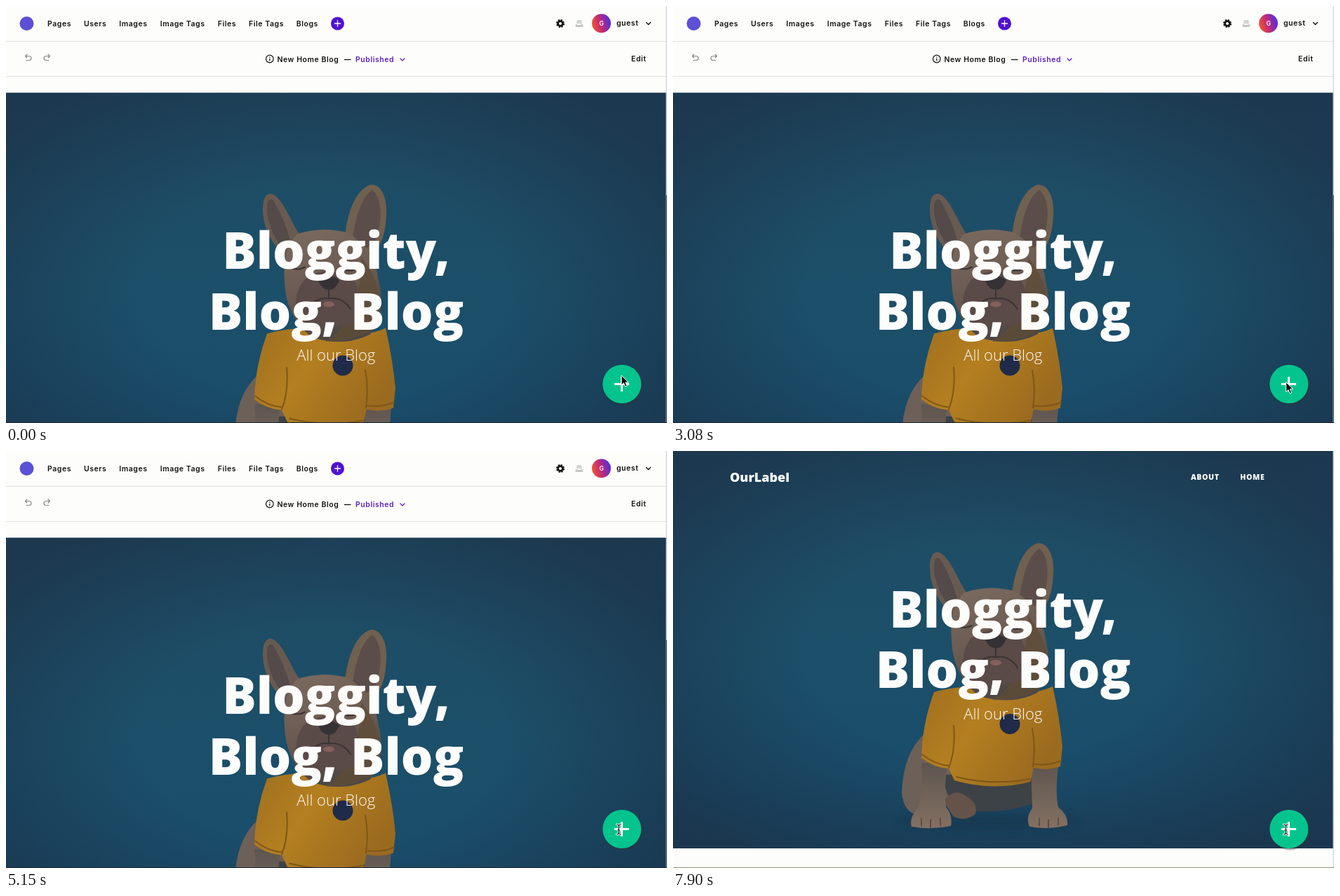
An HTML page for the animation above (8000 ms loop, 942x595 px).

```html
<!DOCTYPE html>
<html lang="en">
<head>
<meta charset="utf-8">
<title>Blog page preview</title>
<style>
  html, body { margin: 0; width: 100%; height: 100%; overflow: hidden; background: #fdfdfb; }
  svg { display: block; width: 942px; height: 595px; }
  .ui { font: 600 10.5px Inter, sans-serif; letter-spacing: .55px; fill: #111; }
  .hero { font-family: "Open Sans", sans-serif; fill: #fdfdfb; }
  .title { font-size: 72px; font-weight: 800; text-anchor: middle; }
  .sub { font-size: 22px; font-weight: 300; text-anchor: middle; }
  .brand { font-size: 18px; font-weight: 800; }
  .link { font-size: 10.6px; font-weight: 800; letter-spacing: .6px; }
  .line { fill: none; stroke-linecap: round; stroke-linejoin: round; }
</style>
</head>
<body>
<svg viewBox="0 0 942 595">
  <defs>
    <linearGradient id="wall" x2="0" y2="1">
      <stop offset="0" stop-color="#1f4b63"/>
      <stop offset=".5" stop-color="#1c4f69"/>
      <stop offset=".85" stop-color="#194d6b"/>
      <stop offset="1" stop-color="#1a4864"/>
    </linearGradient>
    <radialGradient id="vignette" cx=".48" cy=".5" r=".62">
      <stop offset=".45" stop-color="#1b3249" stop-opacity="0"/>
      <stop offset="1" stop-color="#1b3249" stop-opacity=".75"/>
    </radialGradient>
    <linearGradient id="fur" x2=".3" y2="1">
      <stop offset="0" stop-color="#7b6b5f"/>
      <stop offset=".55" stop-color="#6c5b52"/>
      <stop offset="1" stop-color="#4d4745"/>
    </linearGradient>
    <linearGradient id="leg" x2="0" y2="1">
      <stop offset="0" stop-color="#5d554f"/>
      <stop offset="1" stop-color="#847062"/>
    </linearGradient>
    <linearGradient id="shirt" x2="1" y2=".5">
      <stop offset="0" stop-color="#a06f20"/>
      <stop offset=".45" stop-color="#b47f20"/>
      <stop offset="1" stop-color="#9a6a1f"/>
    </linearGradient>
    <linearGradient id="avatar" x1="0" y1=".65" x2="1" y2=".35">
      <stop offset="0" stop-color="#f4552a"/>
      <stop offset=".45" stop-color="#c32a76"/>
      <stop offset="1" stop-color="#4a2fe6"/>
    </linearGradient>
    <filter id="soft" x="-30%" y="-60%" width="160%" height="220%"><feGaussianBlur stdDeviation="6"/></filter>
    <filter id="shade" x="-30%" y="-30%" width="160%" height="160%"><feGaussianBlur stdDeviation="1.3"/></filter>
  </defs>
  <rect width="942" height="595" fill="#fdfdfb"/>

  <g id="page">
    <rect width="941" height="567" fill="url(#wall)"/>
    <rect width="941" height="567" fill="url(#vignette)"/>

    <g id="dog">
      <ellipse cx="450" cy="528" rx="130" ry="12" fill="#12384f" opacity=".7" filter="url(#soft)"/>
      <path d="M360 402Q328 430 326 487Q328 517 352 520L400 500V420Z" fill="#6d6058"/>
      <path d="M380 462H520V500Q470 522 400 510Z" fill="#3d4247"/>
      <path d="M386 500Q400 478 420 494Q435 503 431 518Q415 530 399 521Z" fill="#655349"/>
      <path d="M354 445H391Q386 485 389 508Q399 520 396 535Q368 541 340 536Q336 523 349 510Q358 483 354 445Z" fill="url(#leg)"/>
      <path d="M510 445H550Q544 485 549 508Q564 520 562 534Q535 541 508 536Q502 523 512 510Z" fill="url(#leg)"/>
      <path class="line" d="M354 524v11M367 526v11M381 524v11M522 524v11M535 526v11M549 524v10" stroke="#4d4540" stroke-width="1.5"/>
      <path d="M368 184C362 152 371 139 382 146C397 156 405 183 419 203L400 237Q374 212 368 184Z" fill="#685a51"/>
      <path d="M373 178C370 157 374 149 381 154Q397 181 405 211L395 223Q378 203 373 178Z" fill="#534a49"/>
      <path d="M483 205C487 167 500 139 518 132C533 128 544 149 542 174C541 205 533 220 522 232Z" fill="#70604f"/>
      <path d="M494 206C500 171 508 148 522 139C535 149 538 178 527 211L514 222Z" fill="#5b4d49"/>
      <path d="M372 344Q420 331 460 340Q510 351 541 336Q551 380 555 422L552 450Q534 457 514 452L509 472Q457 486 401 470L393 453Q372 452 354 438Q355 390 372 344Z" fill="url(#shirt)"/>
      <path class="line" d="M355 433Q374 448 394 449M515 447Q537 449 553 442M393 452Q403 427 400 392M513 450Q517 421 512 396M404 465Q456 478 508 468" stroke="#805718" stroke-width="2"/>
      <circle cx="480" cy="389.500" r="14.500" fill="#202b49"/>
      <path d="M415 202Q450 190 487 200Q525 224 531 268Q543 318 519 345Q480 364 435 349Q398 317 397 270Q393 225 415 202Z" fill="url(#fur)"/>
      <path d="M506 235Q543 280 529 330Q506 357 455 355Q506 325 506 235Z" fill="#5f4d36" opacity=".75"/>
      <path d="M424 268Q460 241 496 268Q513 300 499 326Q460 342 416 322Q407 292 424 268Z" fill="#5a4a48"/>
      <path d="M445 268Q460 255 475 268Q469 283 460 281Q450 282 445 268Z" fill="#353235"/>
      <path class="line" d="M404 249q11 6 22 0M480 252q12 5 23-2M460 281v13Q443 291 431 309M460 294Q479 291 491 309" stroke="#3b3435" stroke-width="2"/>
      <ellipse cx="460" cy="302" rx="8" ry="4" fill="#85605c"/>
    </g>

    <g class="hero">
      <text class="title" x="470.5" y="251.5">Bloggity,</text>
      <text class="title" x="470.5" y="338">Blog, Blog</text>
      <text class="sub" x="470.3" y="382.500">All our Blog</text>
    </g>
  </g>

  <g id="siteNav" class="hero">
    <text class="brand" x="81" y="43.5">OurLabel</text>
    <text class="link" x="738" y="41">ABOUT</text>
    <text class="link" x="808.300" y="41">HOME</text>
  </g>

  <g id="editor" class="ui">
    <rect width="942" height="123.500" fill="#fdfdfb"/>
    <path d="M0 50.500H942M0 100.500H942" stroke="#e2e2e2"/>
    <circle cx="29.500" cy="25" r="10" fill="#5b50d6"/>
    <g id="menu"></g>
    <circle cx="472.5" cy="25" r="9.500" fill="#5011d4"/>
    <path class="line" d="M468.500 25h8M472.500 21v8" stroke="#fff" stroke-width="1.3"/>
    <circle cx="790" cy="25" r="3.400" fill="none" stroke="#111" stroke-width="2.700"/>
    <circle cx="790" cy="25" r="5.100" fill="none" stroke="#111" stroke-width="1.8" stroke-dasharray="2.400 1.600"/>
    <path class="line" d="M814 21.500h6M813.500 24h7M812 27h2.500l1 1h3l1-1h2.500M812 29h10" stroke="#999"/>
    <circle cx="848.500" cy="24.800" r="13.500" fill="url(#avatar)"/>
    <text x="848.800" y="28" text-anchor="middle" style="font-size:8.5px;fill:#fff;letter-spacing:0">G</text>
    <text x="870" y="28.300">guest</text>
    <path class="line" d="M912.500 23.500l3 3 3-3" stroke="#111" stroke-width="1.400"/>
    <g class="line" stroke="#888" stroke-width="1.200">
      <path id="undo" d="M30 69l-2.500 2.500 2.500 2.500M27.500 71.500h5.500a3 3 0 0 1 0 6h-4"/>
      <path d="M60 69l2.500 2.500-2.500 2.500M62.500 71.500h-5.500a3 3 0 0 0 0 6h4"/>
    </g>
    <circle cx="375.800" cy="75.500" r="5.300" fill="none" stroke="#111" stroke-width="1.200"/>
    <path d="M375.800 75v3.300M375.800 72.500v1.300" stroke="#111" stroke-width="1.300"/>
    <text x="386.500" y="80">New Home Blog</text>
    <path d="M482 76.500h9.500" stroke="#111" stroke-width="1.300"/>
    <text x="498" y="80" style="fill:#5a1fc4">Published</text>
    <path class="line" d="M562 75l3 3 3-3" stroke="#5a1fc4" stroke-width="1.300"/>
    <text x="891" y="79.300">Edit</text>
  </g>

  <rect id="edge" x="940.5" width="1.500" height="595" fill="#d5d9dc"/>
  <rect id="edgeLow" x="940.5" y="270" width="1.500" height="325" fill="#52646f"/>
  <rect id="bottom" y="594" width="942" height="1"/>

  <circle cx="879.300" cy="541.300" r="27.500" fill="#333" opacity=".6" filter="url(#shade)"/>
  <circle cx="877.800" cy="539.500" r="27.500" fill="#04c48d"/>
  <path d="M867 539.500h21M877.500 529v21" stroke="#fff" stroke-width="3"/>
  <path id="arrow" d="M0 0V14L3.300 11 5.500 16 8 15 5.800 10H10Z" fill="#111" stroke="#fff" stroke-width="1" stroke-linejoin="round"/>
  <g id="beam" class="line">
    <path d="M-3-7Q0-7 0-4.500Q0-7 3-7M0-5V5M-3 7Q0 7 0 4.500Q0 7 3 7M-1.500 1h3" stroke="#fff" stroke-width="2.800"/>
    <path d="M-3-7Q0-7 0-4.500Q0-7 3-7M0-5V5M-3 7Q0 7 0 4.500Q0 7 3 7M-1.500 1h3" stroke="#111" stroke-width="1.200"/>
  </g>
</svg>
<script>
const LOOP = 8000, PREVIEW_AT = 5300, BEAM_AT = 3200;
const $ = id => document.getElementById(id);
const show = (id, on) => $(id).setAttribute('visibility', on ? 'visible' : 'hidden');
const move = (id, x, y) => $(id).setAttribute('transform', `translate(${x} ${y})`);

// Smooth progress from 0 to 1 between two times
function ease(t, start, end) {
  const p = Math.min(1, Math.max(0, (t - start) / (end - start)));
  return p * p * (3 - 2 * p);
}

const menu = { Pages: 59, Users: 111, Images: 161.3, 'Image Tags': 219.7, Files: 301.7, 'File Tags': 346, Blogs: 413.7 };
$('menu').innerHTML = Object.entries(menu)
  .map(([label, x]) => `<text x="${x}" y="28.500">${label}</text>`).join('');

function draw(now) {
  const t = now % LOOP;
  const preview = t >= PREVIEW_AT;
  const beam = t >= BEAM_AT;

  move('page', 0, preview ? 0 : 123.5);
  show('editor', !preview);
  show('siteNav', preview);
  show('edgeLow', !preview);
  $('bottom').setAttribute('fill', preview ? '#8d9278' : '#1d2a35');

  const settle = ease(t, 20, 800);
  const leave = ease(t, 2610, BEAM_AT);
  move('arrow', 877 + 2 * settle - 6 * leave, 527 + 7 * settle + 3 * leave);
  move('beam', 872.3 + ease(t, 4000, 4300), 540);
  show('arrow', !beam);
  show('beam', beam);
}

function tick() {
  draw(performance.now());
  requestAnimationFrame(tick);
}
tick();
</script>
</body>
</html>
```
